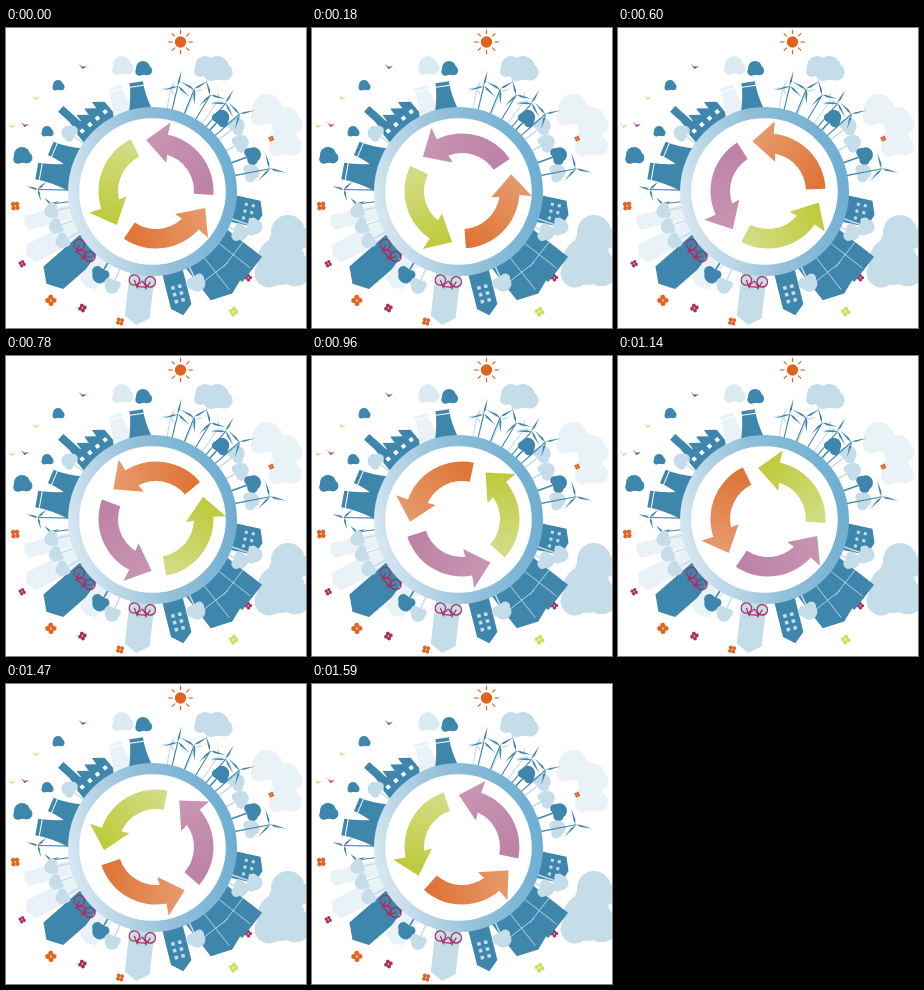
Animation of 300 by 300 pixels, one loop 1620 ms. Source, as an HTML page with a canvas:

```html
<!DOCTYPE html>
<html>
<head>
<meta charset="utf-8">
<style>
html, body { margin: 0; width: 100%; height: 100%; overflow: hidden; background: #fff; }
canvas { display: block; width: 300px; height: 300px; }
</style>
</head>
<body>
<canvas id="stage" width="300" height="300"></canvas>
<script>
const LOOP = 1620, STEP = 30, TAU = Math.PI * 2;
const DARK = '#3f86ad', LIGHT = '#c5dce9', PALE = '#e9f2f7';
const ORANGE = '#e0631f', BERRY = '#ac2d61', LIME = '#cfe06a';
const RING = { x: 146.5, y: 163.5, outer: 84.5, inner: 73.3 };
const stage = document.getElementById('stage').getContext('2d');
const scenery = document.createElement('canvas');
scenery.width = scenery.height = 300;
let g = scenery.getContext('2d');

const rad = deg => deg * Math.PI / 180;

function at(x, y, deg, draw) {
  g.save();
  g.translate(x, y);
  g.rotate(rad(deg));
  draw();
  g.restore();
}

// Draws at a clock angle around the ring; local "up" points outward
function stand(deg, draw, radius = RING.outer) {
  at(RING.x, RING.y, deg, () => at(0, -radius, 0, draw));
}

function disc(color, x, y, r) {
  g.fillStyle = color;
  g.beginPath();
  g.arc(x, y, r, 0, TAU);
  g.fill();
}

function poly(color, ...p) {
  g.fillStyle = color;
  g.beginPath();
  for (let i = 0; i < p.length; i += 2) g.lineTo(p[i], p[i + 1]);
  g.fill();
}

function line(color, width, x1, y1, x2, y2) {
  g.strokeStyle = color;
  g.lineWidth = width;
  g.beginPath();
  g.moveTo(x1, y1);
  g.lineTo(x2, y2);
  g.stroke();
}

function cloud(x, y, r, color) {
  disc(color, x, y, r);
  disc(color, x + r * .6, y + r * .35, r * .7);
  disc(color, x - r * .5, y + r * .5, r * .6);
}

function tree(deg, height, r, color) {
  stand(deg, () => {
    line(color, 1.5, 0, 4, 0, -height);
    cloud(0, -height, r, color);
  });
}

function block(deg, w, h, roof, color) {
  stand(deg, () => poly(color, -w / 2, 4, -w / 2, -h, 0, -h - roof, w / 2, -h, w / 2, 4));
}

function windows(deg, rows, cols, gap, size, color, lift) {
  stand(deg, () => {
    g.fillStyle = color;
    for (let i = 0; i < rows * cols; i++) {
      const x = (i % cols - (cols - 1) / 2) * gap;
      const y = -lift - Math.floor(i / cols) * gap;
      g.fillRect(x - size / 2, y - size / 2, size, size);
    }
  });
}

function tower(deg, w, h, color) {
  stand(deg, () => {
    g.fillStyle = color;
    g.beginPath();
    g.moveTo(-w * .4, -h);
    g.lineTo(w * .4, -h);
    g.quadraticCurveTo(w * .4, -h * .5, w * .7, 4);
    g.lineTo(-w * .7, 4);
    g.quadraticCurveTo(-w * .4, -h * .5, -w * .4, -h);
    g.fill();
    line('#fff', 1, -w / 2, 4 - h, w / 2, 4 - h);
  });
}

function turbine(deg, height, size, tilt, color = DARK) {
  stand(deg, () => {
    line(color, 1.1, 0, 4, 0, -height);
    for (let k = 0; k < 3; k++) {
      at(0, -height, tilt + k * 120, () => poly(color, -.5, 0, -1, -size * .3, 0, -size, 1, -size * .3));
    }
  });
}

function bike(deg) {
  stand(deg, () => {
    g.strokeStyle = BERRY;
    g.lineWidth = 1.4;
    for (const side of [-1, 1]) {
      g.beginPath();
      g.arc(side * 8, 0, 5.2, 0, TAU);
      g.stroke();
      line(BERRY, 1.2, side * 8, 0, side * 4, -8);
      line(BERRY, 1.2, 0, 0, side * 5, -6);
    }
    line(BERRY, 1.2, -5, -6, 5, -6);
  }, 90);
}

function butterfly(deg, radius, size, color) {
  stand(deg, () => {
    for (let k = 0; k < 4; k++) {
      at(0, 0, 45 + k * 90, () => disc(color, size * .7, 0, size * .55));
    }
  }, radius);
}

function bird(x, y, color) {
  at(x, y, 15, () => poly(color, -4, -2.5, 0, -.2, 4.5, -2, 1, 1.8));
}

function drawSky() {
  disc(ORANGE, 174.5, 14, 5.7);
  for (let k = 0; k < 8; k++) {
    at(174.5, 14, k * 45, () => line(ORANGE, 1.2, 0, -8, 0, -12.3));
  }
  cloud(261, 81, 15, PALE);
  cloud(280, 92, 13, PALE);
  cloud(278, 113, 14, PALE);
  cloud(282, 204, 17, LIGHT);
  cloud(275, 233, 24, LIGHT);
  cloud(116, 37, 9, '#dceaf2');
  cloud(137, 40, 7, DARK);
  cloud(52, 57, 5, DARK);
  cloud(41, 103, 5, DARK);
  cloud(16, 127, 8, DARK);
  bird(76, 39, BERRY);
  bird(18, 97, BERRY);
  bird(5, 98, LIME);
  bird(29, 70, LIME);
  butterfly(-96, 138, 4, ORANGE);
  butterfly(-119, 149, 3, BERRY);
  butterfly(-137, 149, 4.5, ORANGE);
  butterfly(-149, 136, 3.5, BERRY);
  butterfly(-166, 134, 3.5, ORANGE);
  butterfly(146, 145, 4, LIME);
  butterfly(132, 129, 3, BERRY);
  butterfly(66, 130, 2.4, ORANGE);
}

function drawFactory() {
  block(-48, 8, 39, 0, DARK);
  block(-40, 42, 8, 0, DARK);
  stand(-40, () => {
    for (let x = -20; x < 20; x += 10) poly(DARK, x, -7, x + 1, -23, x + 11, -15, x + 11, -7);
  });
  windows(-40, 1, 4, 10, 4, '#fff', 7);
  tower(-20, 17, 27, PALE);
  tower(-8.5, 17, 26, DARK);
  tree(-55, 18, 7, LIGHT);
  tower(-67, 18, 26, DARK);
  tower(-80, 21, 33, DARK);
}

function drawWindFarm() {
  for (let k = 0; k < 3; k++) turbine(10 + k * 13, 20 + k * 4, 10, 20 + k * 30, LIGHT);
  cloud(199, 38, 10, LIGHT);
  cloud(211, 40, 12, LIGHT);
  for (let k = 0; k < 5; k++) {
    turbine(13.5 + k * 8.7, 24 + k * 2, 16, k * 37);
    tree(43 + k * 9, 17 + k % 2 * 6, 7.5, k % 3 ? LIGHT : DARK);
  }
  turbine(79, 35, 17, 25);
  turbine(-89, 30, 12, 15);
  turbine(-97, 18, 9, 50);
}

function drawTown() {
  block(-104, 15, 45, 3, PALE);
  block(-117, 20, 52, 5, PALE);
  block(-131, 30, 47, 9, DARK);
  for (let k = 0; k < 3; k++) tree(-101 - k * 9, 19, 6.5, LIGHT);
  block(-145, 20, 28, 4, PALE);
  tree(-148, 15, 7.5, DARK);
  tree(-157, 19, 7, LIGHT);
  block(-173, 25, 42, 8, LIGHT);
  block(166, 21, 34, 9, DARK);
  windows(166, 3, 2, 7, 3.5, LIGHT, 14);
  block(142, 42, 37, 8, DARK);
  block(128, 32, 42, 0, DARK);
  for (const deg of [128, 142]) {
    stand(deg, () => {
      line(LIGHT, .8, -16, -18, 16, -18);
      line(LIGHT, .8, 0, 0, 0, -40);
    });
  }
  tree(154, 18, 8, LIGHT);
  block(102, 27, 23, 5, DARK);
  windows(102, 2, 3, 7, 3, LIGHT, 10);
  tree(115, 13, 7.5, LIGHT);
  tree(109, 24, 7.5, LIGHT);
  bike(-131);
  bike(-173.5);
}

function drawRing() {
  const shade = g.createLinearGradient(65, 185, 228, 145);
  shade.addColorStop(0, '#d6e7f1');
  shade.addColorStop(.5, '#93c0da');
  shade.addColorStop(1, '#6eaed2');
  disc(shade, RING.x, RING.y, RING.outer);
  disc('#fff', RING.x, RING.y, RING.inner);
}

// Tail lies at angle 0 and the head points counterclockwise
function arrow(tail, head) {
  const spot = (r, deg) => [r * Math.cos(rad(deg)), -r * Math.sin(rad(deg))];
  const shade = g.createLinearGradient(...spot(50, 0), ...spot(52, 105));
  shade.addColorStop(0, tail);
  shade.addColorStop(1, head);
  g.fillStyle = shade;
  g.beginPath();
  g.arc(0, 0, 57.5, 0, -rad(82), true);
  g.lineTo(...spot(70, 82));
  g.lineTo(...spot(52, 105));
  g.lineTo(...spot(30, 74));
  g.lineTo(...spot(38, 77));
  g.arc(0, 0, 38, -rad(77), 0);
  g.fill();
}

// Two thirds of a turn in 19 steps each, the last one in 16
function turnAt(step) {
  return -4 + 120 * (step < 38 ? step / 19 : 2 + (step - 38) / 16);
}

drawSky();
drawFactory();
drawWindFarm();
drawTown();
drawRing();
g = stage;

const arrows = [['#bd82a5', '#c795b2'], ['#d3dc85', '#bdca38'], ['#df7436', '#e79a6c']];

function frame(now) {
  const turn = turnAt(Math.floor(now % LOOP / STEP));
  g.fillStyle = '#fff';
  g.fillRect(0, 0, 300, 300);
  g.drawImage(scenery, 0, 0);
  arrows.forEach((tones, k) => at(150, 163, -turn - k * 120, () => arrow(...tones)));
  requestAnimationFrame(frame);
}
requestAnimationFrame(frame);
</script>
</body>
</html>
```
